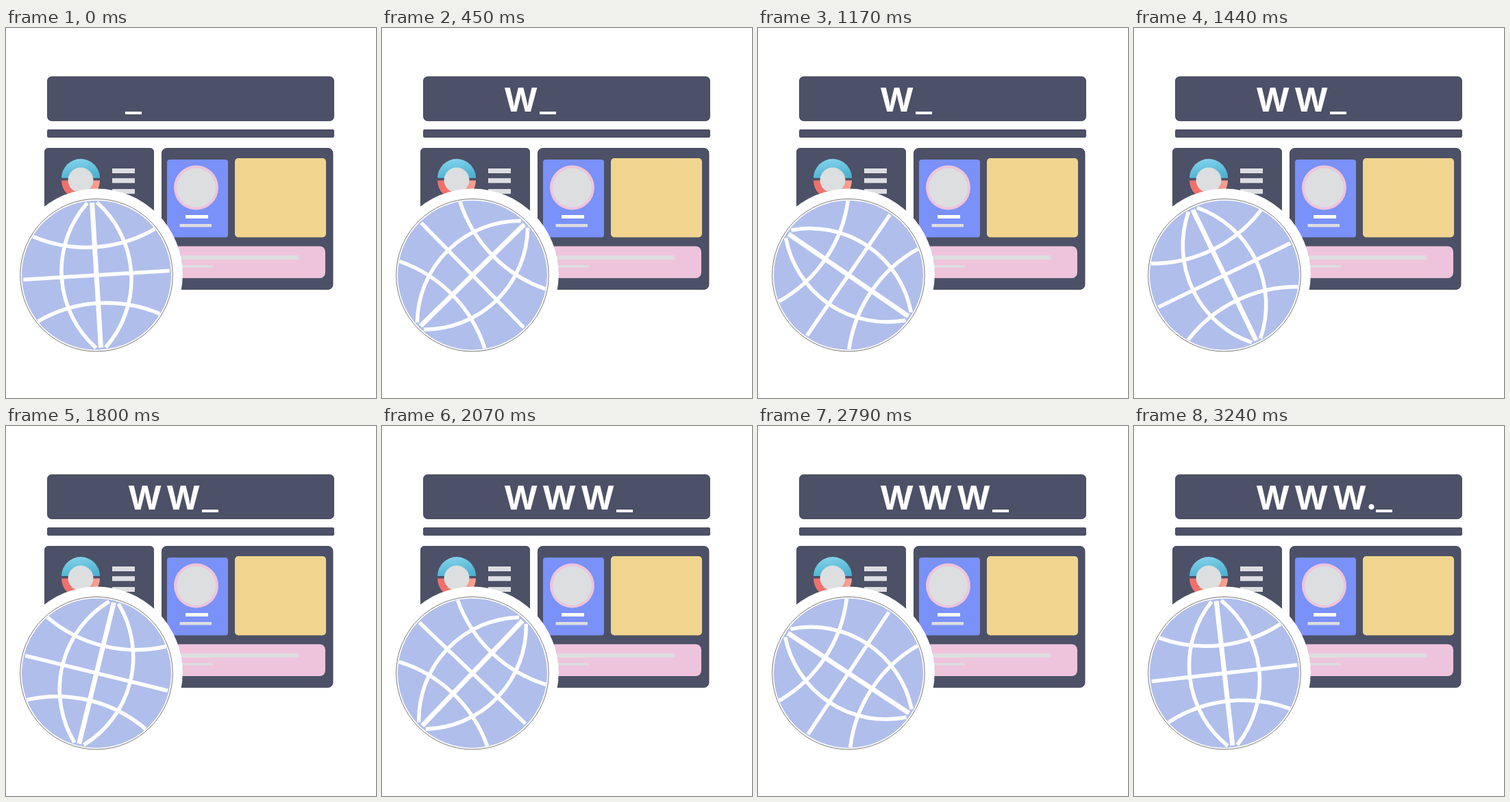
An HTML page that plays this animation: 540x540 px, repeating every 3330 ms.

```html
<!DOCTYPE html>
<html lang="en">
<head>
<meta charset="utf-8">
<title>Web page and turning globe</title>
<style>
  html, body { margin: 0; width: 100%; height: 100%; overflow: hidden; background: #fff; }
  svg { display: block; width: 100vw; height: 100vh; }
  .panel { fill: #4c5167; stroke: #34384a; stroke-width: .8; }
  .grey { fill: #dcdee0; }
  .pink { fill: #eec4dc; }
  .white { fill: #fff; }
  text { font: 700 48px Inter, "Open Sans", sans-serif; text-anchor: middle; fill: #fff; }
  #globe path { fill: none; stroke: #fff; stroke-width: 5.5; }
</style>
</head>
<body>
<svg viewBox="0 0 540 540">
  <defs>
    <linearGradient id="teal" x1="0" y1="0" x2=".3" y2="1">
      <stop offset="0" stop-color="#8ad6ee"/><stop offset="1" stop-color="#4fb3d2"/>
    </linearGradient>
    <linearGradient id="coral">
      <stop offset=".2" stop-color="#f0706a"/><stop offset="1" stop-color="#fba391"/>
    </linearGradient>
  </defs>

  <!-- Address bar -->
  <rect class="panel" x="60.5" y="71" width="418" height="64.5" rx="6"/>
  <rect class="panel" x="60.5" y="148.5" width="418" height="11" rx="1.5"/>
  <text id="address" x="202.7 258.7 314.7 346.5" y="122"></text>
  <rect id="caret" class="white" y="122" width="24" height="4"/>

  <!-- Chart panel -->
  <rect class="panel" x="56.5" y="175.5" width="159" height="206" rx="5"/>
  <path fill="url(#teal)" d="M81 218.5A28 28 0 0 1 137 218.5Z" transform="translate(0 .5)"/>
  <path fill="url(#coral)" d="M81 222.5A28 28 0 0 0 137 222.5Z"/>
  <circle class="grey" cx="109" cy="222" r="18.5"/>
  <path class="grey" d="M155 205h33v7h-33zM155 219.3h33v7h-33zM155 235h33v7h-33z"/>

  <!-- Content panel -->
  <rect class="panel" x="227.5" y="175.5" width="249.5" height="206" rx="7"/>
  <rect fill="#7991f8" x="235" y="192" width="89" height="113.5" rx="4"/>
  <circle class="pink" cx="277.5" cy="233" r="32.5"/>
  <circle class="grey" cx="277.5" cy="233" r="28.5"/>
  <rect class="white" x="262" y="273" width="33" height="5"/>
  <rect class="grey" x="253.5" y="286" width="46.5" height="4.5"/>
  <rect fill="#f1d58e" x="334" y="190" width="133" height="115.5" rx="5"/>
  <rect class="pink" x="235" y="318.5" width="231" height="46.5" rx="8"/>
  <rect class="grey" x="245" y="332" width="182" height="6"/>
  <rect class="grey" x="245" y="346" width="57" height="3.5"/>

  <!-- Globe -->
  <g transform="translate(132 360.7)">
    <circle class="white" cx=".3" cy="-.7" r="125.5"/>
    <circle class="white" r="111.3" stroke="#555" stroke-width=".8"/>
    <g id="globe">
      <circle fill="#b0beec" r="109"/>
      <path style="stroke-width:7" d="M0-106V106"/>
      <path d="M-107 0H107
        M-7-106A150 150 0 0 0-7 106M7-106A150 150 0 0 1 7 106
        M-89-62A199 199 0 0 0 89-62M-89 62A199 199 0 0 1 89 62"/>
    </g>
  </g>
</svg>
<script>
  const STEP = 90, STEPS = 37;
  const CARET_X = [174, 230, 286, 342, 353];
  const [address, caret, globe] = ['address', 'caret', 'globe'].map(id => document.getElementById(id));

  function draw(now) {
    const step = Math.floor(now / STEP) % STEPS;
    const typed = Math.floor((step + 4) / 9);
    const angle = -3.5 + 9.8 * step + .0033 * step * step;
    address.textContent = 'WWW.'.slice(0, typed);
    caret.setAttribute('x', CARET_X[typed]);
    globe.setAttribute('transform', `rotate(${angle})`);
  }

  const start = performance.now();
  function loop() {
    draw(performance.now() - start);
    requestAnimationFrame(loop);
  }
  loop();
</script>
</body>
</html>
```
